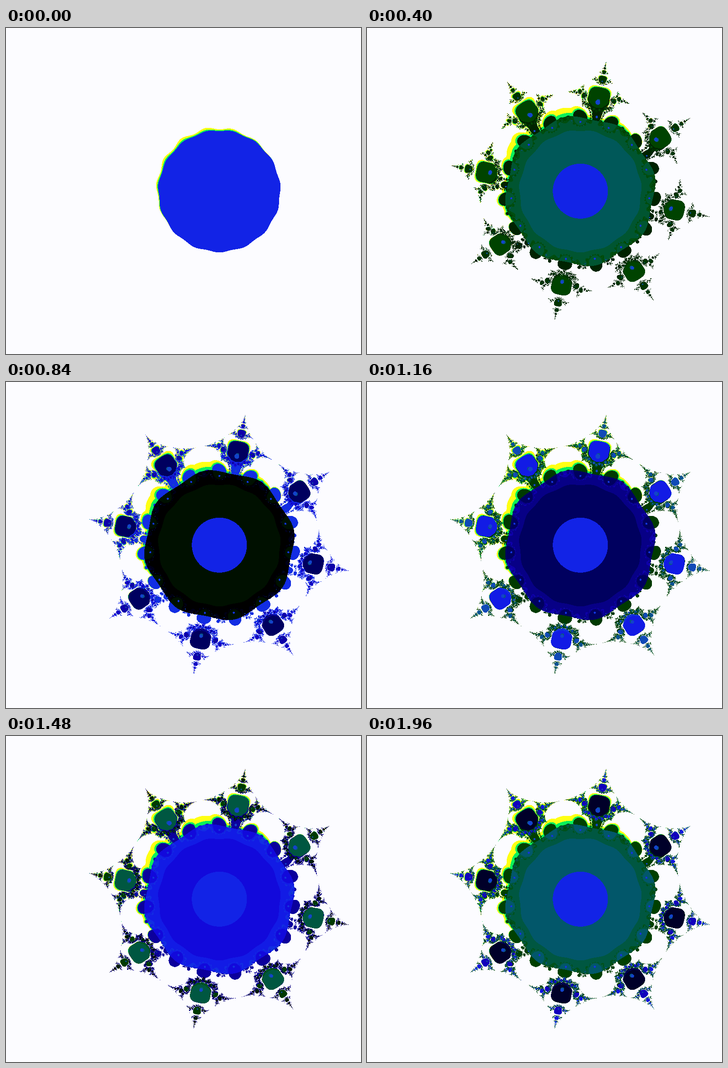
Recreate the animation shown at these times as an HTML page with a canvas. Size 780x718 px, loop 2 s.

```html
<!DOCTYPE html>
<html>
<head>
<meta charset="utf-8">
<style>
html, body { margin: 0; width: 100%; height: 100%; overflow: hidden; background: #fcfcff; }
canvas { display: block; }
</style>
</head>
<body>
<canvas id="stage" width="780" height="718"></canvas>
<script>
// Parameter plane of z -> iA / z^7 + c, started at z = c^2.
// Each frame adds one iteration; colour follows how often |z| stayed below LIMIT.
const CX = 468.8, CY = 359.3, UNIT = 110;
const A = 130, LIMIT = 8.5, HUGE = 5.6e5;
const FRAMES = 50, STEP = 40;
const LEFT = 170, TOP = 60, SIZE = 600;
const WHITE = 100, YELLOW = 101, GREEN = 102;

const ctx = document.getElementById('stage').getContext('2d');
const image = ctx.createImageData(SIZE, SIZE);
const pixels = new Uint32Array(image.data.buffer);

const rgb = (r, g, b) => (255 << 24 | b << 16 | g << 8 | r) >>> 0;

// Cyclic palette: blue, teal, green, black, navy, blue
function tone(count) {
  const cycle = 20.4, quarter = Math.PI / 2;
  const w = count % cycle, k = (count + 4) % cycle - 4;
  const g = 88 * Math.max(0, Math.cos((k - 5) / 7 * quarter)) ** 1.1;
  const b = w < 8 ? 230 * Math.cos(w / 8 * quarter) ** 1.6
    : w > 12 ? 230 * Math.sin((w - 12) / 8.4 * quarter) ** 1.4 : 0;
  const r = Math.min(18, Math.max(0, (b - 95) / 5));
  return rgb(r, g, b);
}
const colors = Array.from({ length: FRAMES + 1 }, (_, i) => tone(i));
colors[WHITE] = rgb(252, 252, 255);
colors[YELLOW] = rgb(255, 255, 20);
colors[GREEN] = rgb(10, 240, 90);

const frames = Array.from({ length: FRAMES }, () => new Uint8Array(SIZE * SIZE));

function orbit(index, cx, cy) {
  let x = cx * cx - cy * cy, y = 2 * cx * cy;
  let count = 0, peak = 0;
  // The glow limit drops towards the upper left
  const side = (.83 * cy - .56 * cx) / Math.hypot(cx, cy);
  const glow = LIMIT * (1 - .42 * Math.max(0, side + .1));
  const inner = (glow + LIMIT) / 2;

  for (let n = 0; n < FRAMES; n++) {
    const r2 = x * x + y * y;
    const x2 = x * x - y * y, y2 = 2 * x * y;
    const x3 = x2 * x - y2 * y, y3 = x2 * y + y2 * x;
    const x6 = x3 * x3 - y3 * y3, y6 = 2 * x3 * y3;
    const x7 = x6 * x - y6 * y, y7 = x6 * y + y6 * x;
    const f = A / (r2 * r2 * r2 * r2 * r2 * r2 * r2);
    x = f * y7 + cx;
    y = f * x7 + cy;

    const size = Math.sqrt(x * x + y * y);
    if (size < LIMIT) count++;
    if (size > peak) peak = size;
    frames[n][index] = count <= n ? count
      : peak > inner ? GREEN
      : peak > glow ? YELLOW : WHITE;

    // An overflowing orbit stops and keeps its colour
    if (!(size < HUGE)) {
      for (let m = n + 1; m < FRAMES; m++) frames[m][index] = count;
      return;
    }
  }
}

for (let j = 0, index = 0; j < SIZE; j++)
  for (let i = 0; i < SIZE; i++, index++)
    orbit(index, (LEFT + i + .5 - CX) / UNIT, (CY - TOP - j - .5) / UNIT);

function draw(n) {
  const codes = frames[n];
  for (let i = 0; i < codes.length; i++) pixels[i] = colors[codes[i]];
  ctx.putImageData(image, LEFT, TOP);
}

let shown = -1;
const start = performance.now();
function tick() {
  const n = Math.floor((performance.now() - start) / STEP) % FRAMES;
  if (n !== shown) draw(shown = n);
  requestAnimationFrame(tick);
}
tick();
</script>
</body>
</html>
```
